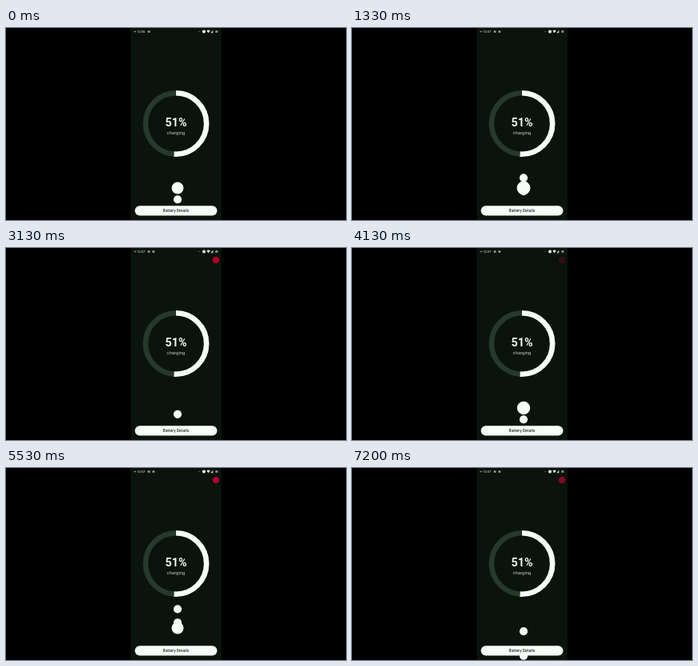
Recreate the animation shown at these times as an HTML page with a canvas. Size 426 by 240 pixels, loop 7.27 s.

```html
<!DOCTYPE html>
<html lang="en">
<head>
<meta charset="utf-8">
<title>Battery charging</title>
<style>
  html, body { margin: 0; width: 100%; height: 100%; overflow: hidden; background: #000; }
  canvas { display: block; width: 426px; height: 240px; }
</style>
</head>
<body>
<canvas id="stage"></canvas>
<script>
const W = 426, H = 240, LOOP = 7270;
const canvas = document.getElementById('stage');
const ctx = canvas.getContext('2d');
const ratio = window.devicePixelRatio || 1;
canvas.width = W * ratio;
canvas.height = H * ratio;
ctx.scale(ratio, ratio);

const SCREEN = '#0a130c', LIGHT = '#f5fdf8', TRACK = '#26392a';
const TAU = Math.PI * 2;
const RING = { x: 213, y: 119.5, r: 38.2, w: 6.6 };
const LEVEL = 0.51;

// Moments at which a rising bubble passes the middle of its path.
const PASSES = [79, 560, 1262, 1354, 1900, 2362, 2790, 3174, 3700,
                4209, 4780, 5402, 5494, 6000, 6650, 7224, 7391];
const MID_Y = 200, SPEED = 0.183, TOP_Y = 162;
const PULSE = 1383, PULSE_HALF = 230, PULSE_LEAD = 38, PULSE_R = 9;

function disc(x, y, r, color) {
  ctx.fillStyle = color;
  ctx.beginPath();
  ctx.arc(x, y, r, 0, TAU);
  ctx.fill();
}

function arc(from, to, color) {
  ctx.strokeStyle = color;
  ctx.lineWidth = RING.w;
  ctx.beginPath();
  ctx.arc(RING.x, RING.y, RING.r, from * TAU - TAU / 4, to * TAU - TAU / 4);
  ctx.stroke();
}

function label(text, x, y, font, color, align = 'center') {
  ctx.font = font + ' Roboto, Arial, sans-serif';
  ctx.fillStyle = color;
  ctx.textAlign = align;
  ctx.fillText(text, x, y);
}

function poly(color, ...points) {
  ctx.fillStyle = color;
  ctx.beginPath();
  points.forEach(([x, y]) => ctx.lineTo(x, y));
  ctx.fill();
}

function statusBar(t) {
  const later = t >= 700;
  ctx.fillStyle = '#777f78';
  ctx.fillRect(160.3, 3.8, 2.8, 1.4);
  label(later ? '12:57' : '12:56', 164.4, 5.9, '500 3.8px', '#d5ddd6', 'left');
  disc(179, 4.5, 1.6, '#8f9790');
  if (later) disc(184.8, 4.5, 1.6, '#8f9790');
  disc(242, 4.4, 0.6, '#858d86');
  disc(248, 4.4, 2, LIGHT);
  poly(LIGHT, [251.4, 3.2], [253.6, 2.4], [255.8, 3.2], [253.6, 6.2]);
  poly('#c5cdc6', [256.3, 6.2], [259.4, 2.6], [259.4, 6.2]);
  disc(263.9, 4.4, 1.7, '#858d86');
}

function recordDot(t) {
  if (t < 2100) return;
  const wave = (1 + Math.cos((t - 3200) / 2200 * TAU)) / 2;
  ctx.globalAlpha = 0.2 + 0.8 * wave;
  disc(263, 15, 4.3, '#b0002c');
  ctx.globalAlpha = 1;
}

function bubbles(t) {
  for (const pass of PASSES) {
    const y = MID_Y + (pass - t) * SPEED;
    if (y > TOP_Y && y < H + 6) disc(215, y, 5.1, LIGHT);
  }
  const phase = (t + PULSE_LEAD + PULSE / 2) % PULSE - PULSE / 2;
  const size = 1 - Math.abs(phase) / PULSE_HALF;
  if (size > 0) disc(215, MID_Y, PULSE_R * size, LIGHT);
}

function draw(t) {
  ctx.fillStyle = '#000';
  ctx.fillRect(0, 0, W, H);
  ctx.fillStyle = SCREEN;
  ctx.fillRect(156.3, 0, 113.7, H);

  statusBar(t);
  recordDot(t);
  bubbles(t);

  arc(0, 1, TRACK);
  arc(0, LEVEL, LIGHT);
  label('51%', 213, 123.4, 'bold 14.4px', '#edf5ef');
  label('charging', 213, 132.8, '5.9px', '#c5cdc6');

  ctx.fillStyle = LIGHT;
  ctx.beginPath();
  ctx.roundRect(161.5, 222.2, 103, 12.3, 6.15);
  ctx.fill();
  label('Battery Details', 212.9, 230.2, '500 5px', '#2c342e');
}

const start = performance.now();
function tick() {
  draw((performance.now() - start) % LOOP);
  requestAnimationFrame(tick);
}
tick();
</script>
</body>
</html>
```
